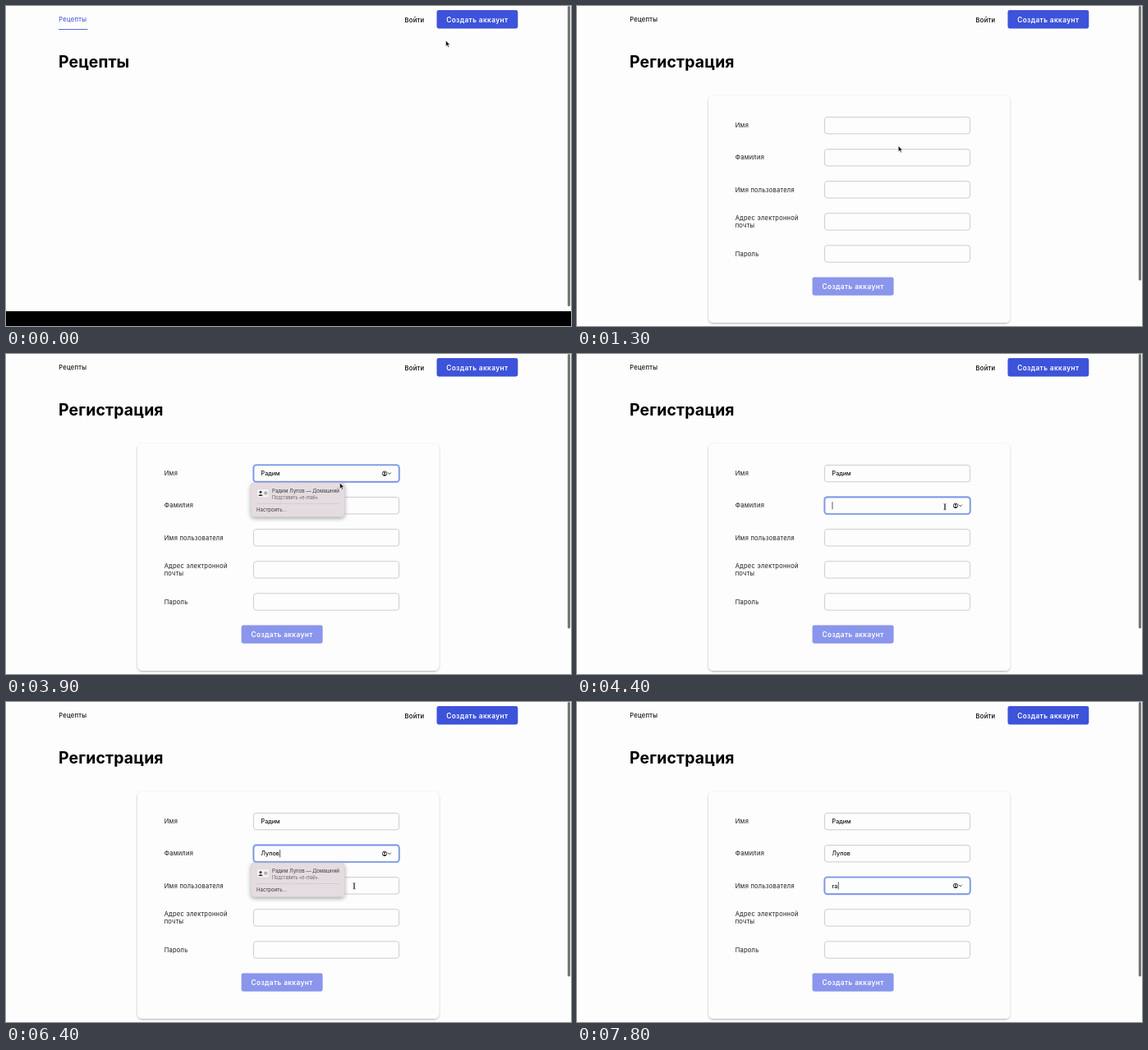
An HTML page that plays this animation: 688x390 px, repeating every 8 s.

```html
<!DOCTYPE html>
<html lang="ru">
<head>
<meta charset="utf-8">
<title>Регистрация</title>
<style>
  html, body { margin: 0; width: 100%; height: 100%; overflow: hidden; background: #fdfdfd; }
  svg { display: block; width: 688px; height: 390px; font-family: Inter, sans-serif; font-optical-sizing: none; }
  .h1 { font-size: 19.4px; font-weight: 700; letter-spacing: .15px; }
  .nav { font-size: 7.6px; font-weight: 500; letter-spacing: .24px; }
  .label { font-size: 7.5px; fill: #1c1c1c; letter-spacing: .26px; }
  .btn { font-size: 8.3px; font-weight: 600; fill: #fff; text-anchor: middle; letter-spacing: .38px; }
  .value { font-size: 7.2px; font-weight: 500; fill: #111; }
  .pop { font-size: 6.1px; fill: #3d383a; }
  .small { font-size: 5.5px; fill: #6a6366; }
</style>
</head>
<body>
<svg viewBox="0 0 688 390" xmlns="http://www.w3.org/2000/svg">
  <defs>
    <filter id="cardShadow" x="-5%" y="-5%" width="110%" height="110%">
      <feDropShadow dx="0" dy="1" stdDeviation="0.9" flood-opacity=".32"/>
    </filter>
    <filter id="popShadow" x="-15%" y="-25%" width="130%" height="160%">
      <feDropShadow dx="0" dy="2" stdDeviation="2.5" flood-opacity=".32"/>
    </filter>
  </defs>
  <rect width="688" height="390" fill="#fdfdfd"/>

  <text id="link" class="nav" x="64.2" y="19.4">Рецепты</text>
  <text class="nav" x="485.6" y="19.7">Войти</text>
  <rect id="create" x="524.5" y="5.1" width="98.8" height="22.3" rx="2.4"/>
  <text class="btn" x="573.8" y="19.5">Создать аккаунт</text>
  <text id="title" class="h1" x="64" y="75.2"></text>

  <g id="home">
    <path d="M64 28.5H99.5" stroke="#5b68df" stroke-width="1"/>
    <rect y="372" width="688" height="18"/>
  </g>

  <g id="signup">
    <rect x="160" y="109" width="367.3" height="277" rx="6" fill="#fdfdfd" filter="url(#cardShadow)"/>
    <g id="rows"></g>
    <rect x="286.6" y="330.4" width="99" height="22.3" rx="2.4" fill="#8a96ec"/>
    <text class="btn" x="336.1" y="344.7">Создать аккаунт</text>
    <g id="focus">
      <rect x="301.4" y="135.3" width="177.4" height="20.6" rx="3.4" fill="none" stroke="#a9bdf2" stroke-width="2.6" opacity=".5"/>
      <rect x="301.4" y="135.3" width="177.4" height="20.6" rx="3.4" fill="none" stroke="#7c98e6" stroke-width="1.6"/>
      <g fill="none" stroke="#222" stroke-width=".9">
        <circle cx="461" cy="145.7" r="2.7"/>
        <path d="M465.3 144.9l1.6 1.6 1.6-1.6" stroke-linecap="round"/>
      </g>
      <circle cx="461" cy="145" r="1" fill="#222"/>
      <path d="M459 147.6q2-2 4 0l-2 1z" fill="#222"/>
    </g>
    <rect id="caret" y="141" width=".8" height="9.2" fill="#333"/>
    <g id="popup">
      <rect x="298" y="156.8" width="114.4" height="41.6" rx="4.5" fill="#e4dce0" stroke="#c8c0c4" stroke-width=".5" filter="url(#popShadow)"/>
      <rect x="305.3" y="164.4" width="15" height="10.6" rx="1" fill="#f4f1f2" stroke="#c9c3c6" stroke-width=".4"/>
      <circle cx="310" cy="168.3" r="1.5" fill="#333"/>
      <path d="M307.2 173q2.8-4 5.6 0z" fill="#333"/>
      <circle cx="316.3" cy="169.5" r="2.2" fill="#b5b0b3"/>
      <text class="pop" x="324" y="169">Радим Лупов — Домашний</text>
      <text class="small" x="324" y="176.6">Подставить «e-mail».</text>
      <path d="M305 182.4H405.5" stroke="#cbc2c6" stroke-width=".6"/>
      <text class="pop" x="305" y="192.2">Настроить…</text>
    </g>
  </g>

  <rect id="scroll" x="683.9" y="0" width="3.2" rx="1.5" fill="#767676"/>

  <g id="cursor">
    <path id="arrow" d="M0 0V7.2L1.7 5.7L2.8 8.3L4 7.8L2.9 5.3H5.1Z" fill="#111" stroke="#fff" stroke-width=".5"/>
    <path id="hand" d="M-1.5-4.2q.8-.9 1.3 0v2l3 .7q.8.3.6 1.4L2.7 4H-1L-3 .6q.2-1 1.5 0z" fill="#eee" stroke="#333" stroke-width=".8"/>
    <path id="beam" d="M-1.4-3.6Q0-3.6 0-2.8V2.8Q0 3.6-1.4 3.6M1.4-3.6Q0-3.6 0-2.8V2.8Q0 3.6 1.4 3.6" fill="none" stroke="#222" stroke-width=".8"/>
  </g>
</svg>
<script>
const LOOP = 8000, STEP = 100, ROW = 39.1, TEXT_X = 310.6;
const $ = id => document.getElementById(id);
const show = (id, on) => $(id).style.display = on ? '' : 'none';

const labels = [['Имя'], ['Фамилия'], ['Имя пользователя'], ['Адрес электронной', 'почты'], ['Пароль']];
$('rows').innerHTML = labels.map((lines, i) => {
  const y = i * ROW;
  const top = lines.length > 1 ? 143.8 : 148.3;
  return lines.map((s, k) => `<text class="label" x="192.7" y="${y + top + k * 9.2}">${s}</text>`).join('') +
    `<rect x="301.6" y="${y + 135.4}" width="177" height="20.4" rx="3" fill="#fdfdfd" stroke="#cdcdcd" stroke-width="1"/>` +
    `<text class="value" x="${TEXT_X}" y="${y + 148.3}"></text>`;
}).join('');
const values = [...document.querySelectorAll('.value')];

// Typed text per field and the moment of each key
const typing = [
  ['Радим', [2800, 3000, 3100, 3300, 3400]],
  ['Лупов', [4900, 5100, 5200, 5300, 5400]],
  ['ra', [7700, 7800]]
];
const focusAt = [[1700, 0], [4300, 1], [6500, 2]];
const popups = [[2800, 4300, 0], [5800, 6500, 1]];
const caretOn = [[1800, 2300], [3000, 3900], [4300, 4900], [5000, 5900], [6400, 7100], [7600, 8000]];

// Cursor strokes: [time, x, y]
const strokes = [
  [[0, 535.5, 42], [100, 538, 41], [200, 545, 35], [300, 552, 30], [400, 554, 29.5], [900, 554, 29.5],
   [1000, 549, 38], [1100, 512, 72], [1200, 450, 130], [1300, 391.3, 170.4], [1400, 387, 160],
   [1500, 386, 155], [1600, 386, 153.5], [2300, 386, 153.5]],
  [[3800, 388, 152], [4000, 425, 162], [4200, 446, 183], [4400, 448, 186.3], [4900, 448, 186.3]],
  [[5800, 448, 186.3], [6000, 444, 196], [6200, 430, 217], [6400, 424, 224.3], [7700, 424, 224.3]]
];

const within = (t, [a, b]) => t >= a && t < b;

function cursorAt(t) {
  const path = strokes.find(s => within(t, [s[0][0], s[s.length - 1][0]]));
  if (!path) return null;
  const i = path.findIndex(k => k[0] > t);
  const [t0, x0, y0] = path[i - 1], [t1, x1, y1] = path[i];
  const p = (t - t0) / (t1 - t0);
  return [x0 + (x1 - x0) * p, y0 + (y1 - y0) * p];
}

function drawCursor(t) {
  const pos = cursorAt(t);
  show('cursor', pos);
  if (!pos) return;
  const [x, y] = pos;
  const inField = x > 301 && x < 479 && y > 135 && (y - 135.5) % ROW < 20.5;
  const kind = within(t, [300, 1000]) ? 'hand' : t >= 1400 && inField ? 'beam' : 'arrow';
  for (const id of ['arrow', 'hand', 'beam']) show(id, id === kind);
  $('cursor').setAttribute('transform', `translate(${x} ${y})`);
}

function drawForm(t) {
  typing.forEach(([word, keys], i) => {
    values[i].textContent = word.slice(0, keys.filter(k => k <= t).length);
  });
  const current = focusAt.filter(f => f[0] <= t).pop();
  show('focus', current);
  show('caret', current && caretOn.some(r => within(t, r)));
  if (current) {
    const row = current[1], shift = `translate(0 ${row * ROW})`;
    const field = values[row];
    const width = field.textContent ? field.getComputedTextLength() + .4 : 0;
    $('focus').setAttribute('transform', shift);
    $('focus').setAttribute('opacity', t < 1800 ? .6 : 1);
    $('caret').setAttribute('transform', shift);
    $('caret').setAttribute('x', TEXT_X + width);
  }
  const popup = popups.find(p => within(t, p));
  show('popup', popup);
  if (popup) $('popup').setAttribute('transform', `translate(0 ${popup[2] * ROW})`);
}

function draw(time) {
  const t = Math.floor(time % LOOP / STEP) * STEP;
  const form = t >= 900;
  show('home', !form);
  show('signup', form);
  $('title').textContent = form ? 'Регистрация' : 'Рецепты';
  $('link').setAttribute('fill', form ? '#111' : '#5160da');
  $('scroll').setAttribute('height', form ? 334.5 : 366);
  $('create').setAttribute('fill', within(t, [300, 1000]) ? '#4a5fe4' : '#3d53d9');
  if (form) drawForm(t);
  drawCursor(t);
}

const start = performance.now();
(function tick() {
  draw(performance.now() - start);
  requestAnimationFrame(tick);
})();
</script>
</body>
</html>
```
